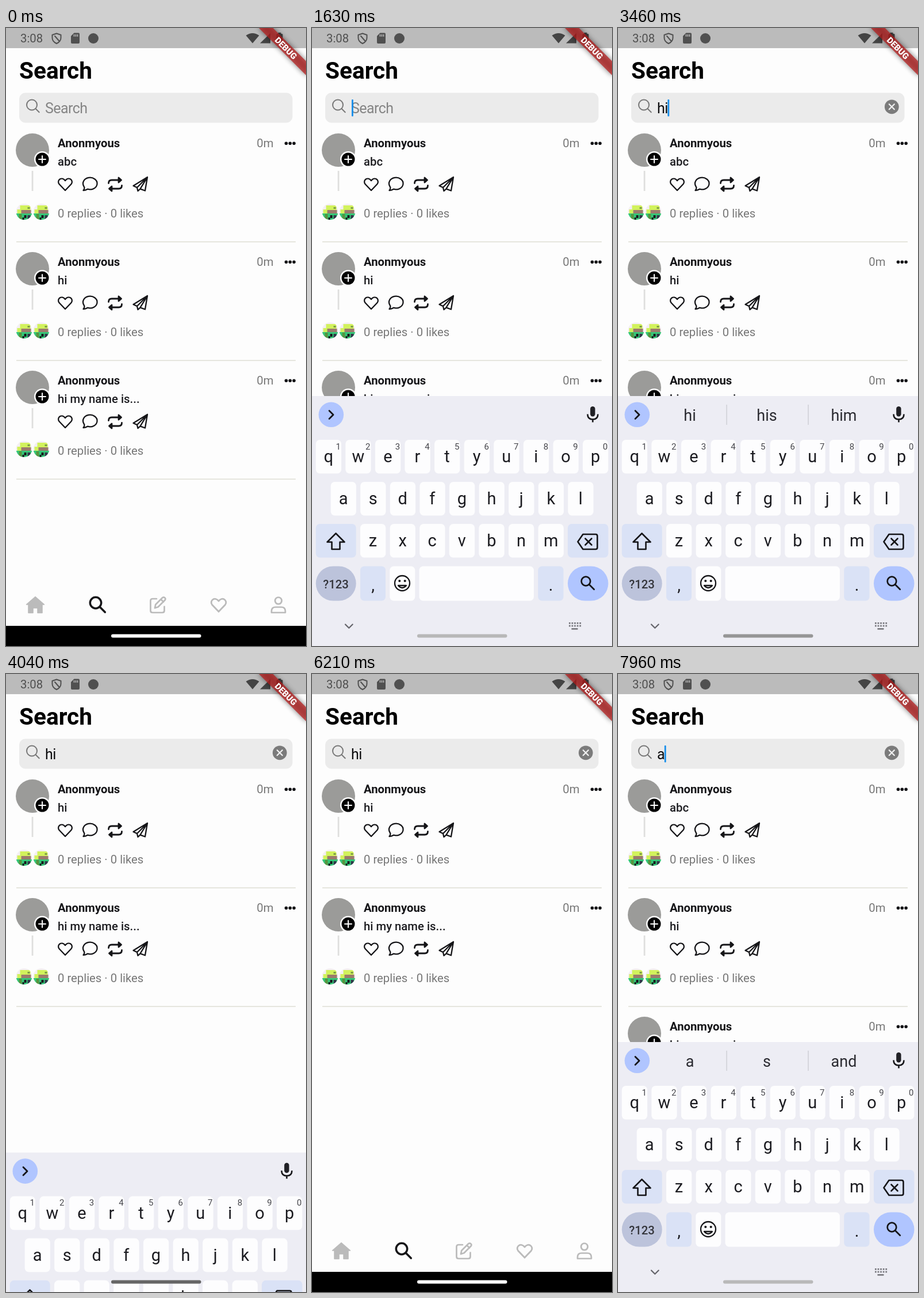
These frames come from a looping animation (522x1073 px, 8 s). An HTML page:

```html
<!DOCTYPE html>
<html lang="en">
<head>
<meta charset="utf-8">
<title>Search screen</title>
<style>
html, body { margin: 0; width: 100%; height: 100%; overflow: hidden; background: #fdfdfd; }
svg { display: block; width: 522px; height: 1073px; font-family: Roboto, sans-serif; }
.line { fill: none; stroke: #151518; stroke-width: 2.3; stroke-linecap: round; stroke-linejoin: round; }
.off { stroke: #bbb; stroke-width: 2.7; }
.post { font-size: 20.3px; fill: #777; }
.field { font-size: 25px; letter-spacing: -.55px; }
.key { font-size: 29px; fill: #1b1b20; text-anchor: middle; }
.word { font-size: 27px; fill: #2b2b31; text-anchor: middle; }
</style>
</head>
<body>
<svg id="stage" viewBox="0 0 522 1073"></svg>
<script>
const PERIOD = 8000, PITCH = 206, KEYBOARD_HEIGHT = 434;
const stage = document.getElementById('stage');
const $ = id => document.getElementById(id);

const rect = (x, y, w, h, fill, r = 0) =>
  `<rect x="${x}" y="${y}" width="${w}" height="${h}" rx="${r}" fill="${fill}"/>`;
const circle = (x, y, r, fill, more = '') => `<circle cx="${x}" cy="${y}" r="${r}" fill="${fill}" ${more}/>`;
const path = (d, cls = 'line', more = '') => `<path d="${d}" class="${cls}" ${more}/>`;
const text = (x, y, s, more = '') => `<text x="${x}" y="${y}" ${more}>${s}</text>`;
const at = (x, y, body, more = '') => `<g transform="translate(${x} ${y})" ${more}>${body}</g>`;

const HEART = 'M0 10.5 L-10.5 -.5 C-15.5 -7 -6 -14.5 0 -6.5 C6 -14.5 15.5 -7 10.5 -.5Z';
const BUBBLE = 'M-12 11 C-9.5 8 -9.5 6 -11 4 A12.3 10.3 0 1 1 -4.5 8.7 Q-8 11 -12 11Z';
const REPOST = 'M-11.5 -2 Q-11.5 -7.5 -6 -7.5 H9 M6 -11.5 L10.5 -7.5 6 -3.5Z' +
               'M11.5 2 Q11.5 7.5 6 7.5 H-9 M-6 11.5 L-10.5 7.5 -6 3.5Z';
const PLANE = 'M12.5 -12 L-12 3 -5.5 6 -4 12 0 8.3 8.5 11.5Z M12.5 -12 L-5.5 6 M12.5 -12 L0 8.3';

function miniAvatar(x) {
  const art = rect(-7, -11, 18, 9, '#d2f25c') + rect(-12, -4, 9, 8, '#d2f25c') +
    rect(-5, -3, 17, 6, '#9b7b6c') + rect(6, -8, 4, 3, '#7c9c45') +
    rect(-14, 3, 28, 12, '#35c878') + rect(-9, 4, 5, 10, '#57933f') +
    rect(0, 6, 4, 5, '#17171c') + rect(6, 6, 5, 7, '#33364a') + rect(-3, 10, 3, 4, '#17171c');
  return at(x, 319, circle(0, 0, 15.5, '#fdfdfd') + circle(0, 0, 14, '#f4eff3') +
    `<g clip-path="url(#disc)">${art}</g>`);
}

function post(message, i) {
  const body = circle(46, 212, 29, '#9b9b99') + circle(63, 228, 14, '#fdfdfd') + circle(63, 228, 11.5, '#000') +
    path('M57 228h12M63 222v12', 'line', 'style="stroke:#fff;stroke-width:2"') +
    rect(44.7, 248, 2.7, 35, '#dededd') + miniAvatar(31.5) + miniAvatar(61.5) +
    text(90, 207.3, 'Anonmyous', 'font-weight="600" fill="#151518"') +
    text(90, 239, message, 'font-weight="500" fill="#1c1c20"') +
    text(465.5, 207.3, '0m', 'text-anchor="end"') +
    text(90, 329, '0 replies · 0 likes') +
    [487.5, 494.3, 501.1].map(x => circle(x, 200.3, 2.8, '#151518')).join('') +
    at(103, 271.5, path(HEART)) + at(146.5, 271, path(BUBBLE)) +
    at(190, 271.5, path(REPOST, 'line', 'style="stroke-width:2.8"')) + at(233.5, 271, path(PLANE)) +
    rect(18, 370.5, 486, 1.6, '#e0e0d6');
  return `<g id="post${i}" class="post">${body}</g>`;
}

function statusBar() {
  const ink = '#505050';
  return rect(0, 0, 522, 35, '#bbb') + text(25, 25, '3:08', `font-size="20.3" fill="${ink}"`) +
    path('M88 9.5 L95.5 12 V17 C95.5 22 92.5 25 88 27 C83.5 25 80.5 22 80.5 17 V12Z M85 14 L92 22', 'line',
      `style="stroke:${ink};stroke-width:2"`) +
    path('M118.500 8.500 H126 Q128 8.500 128 10.500 V25 Q128 27 126 27 H115 Q113 27 113 25 V14Z', '', `fill="${ink}"`) +
    path('M118.500 11v4M121.500 11v4M124.500 11v4', '', 'stroke="#bbb" stroke-width="1.5"') +
    circle(152, 18, 9, ink) +
    path('M417.500 13 Q429 5 440.500 13 L429 26.500Z M460 9 V26.500 H442Z', '', 'fill="#444"') +
    rect(470.5, 10, 11, 17, '#444', 1.5) + rect(473.5, 8, 5, 3, '#444');
}

function banner() {
  return `<g transform="translate(522 0) rotate(45)">
    <rect x="-58" y="40.600" width="116" height="17.400" filter="url(#soft)" opacity=".5"/>
    ${rect(-70, 40.6, 140, 17.4, 'rgba(183,28,28,.72)')}
    ${text(0, 54.6, 'DEBUG', 'font-size="14.8" font-weight="900" fill="#fff" text-anchor="middle"')}</g>`;
}

function searchField() {
  return rect(23, 112.5, 475.5, 52, '#ebebeb', 11) +
    path('M54.500 0', 'line') +
    `<g class="line" style="stroke:#777;stroke-width:2"><circle cx="45" cy="133.500" r="9"/><path d="M51.700 140.200l6 6"/></g>` +
    text(68, 147.5, '', 'id="query" class="field"') +
    `<rect id="cursor" y="124" width="2.800" height="29.500" rx="1.200" fill="#168eea"/>` +
    `<g id="clear">${circle(476.3, 136.8, 12.4, '#7b7b7b')}${path('M471.800 132.300l9 9m0-9l-9 9', 'line',
      'style="stroke:#f0f0f0"')}</g>`;
}

function navigation() {
  return path('M51 987.500 L66.500 1001 H63 V1015.500 H55 V1007 H47 V1015.500 H39 V1001 H35.500Z', '',
      'fill="#bbb" stroke="#bbb" stroke-width="1.500" stroke-linejoin="round"') +
    `<g class="line" style="stroke-width:3.500"><circle cx="156" cy="998" r="9.700"/><path d="M163.300 1005.300l9 9"/></g>` +
    path('M262 991h-7q-3.500 0-3.500 3.500v17q0 3.500 3.500 3.500h17q3.500 0 3.500-3.500v-7' +
      'M259 1007l1.300-6 12-12q2-1.500 4 .3t.3 4l-12 12zM269.500 992l4.500 4.500', 'line off') +
    at(370, 1002, path(HEART, 'line off', 'transform="scale(1.08)"')) +
    path('M474 988.500a5.800 5.800 0 1 1-.1 0zM462 1015v-2.500q0-7 7-7h10q7 0 7 7v2.500z', 'line off') +
    rect(0, 1038, 522, 35, '#000');
}

function keyboard() {
  const white = '#fdfdfe', tint = '#dae2f6', blue = '#b0c5ff';
  const row = (letters, x, y, digits) => [...letters].map((c, i) => {
    const left = x + i * 51.6;
    return rect(left, y, 44.3, 58.5, white, 7) + text(left + 22, y + 38.8, c, 'class="key"') +
      (digits ? text(left + 39, y + 16.5, (i + 1) % 10, 'font-size="15" fill="#45454b" text-anchor="middle"') : '');
  }).join('');
  return rect(0, 639, 522, KEYBOARD_HEIGHT, '#ededf4') +
    circle(33.3, 671.3, 21.8, blue) + path('M30 664.500l7 7-7 7', 'line', 'style="stroke-width:2.800"') +
    `<g id="words">${rect(188.3, 654, 1.6, 35, '#d0d1d8')}${rect(330.3, 654, 1.6, 35, '#d0d1d8')}
      ${[125, 259, 393].map((x, i) => text(x, 682, '', `id="word${i}" class="word"`)).join('')}</g>` +
    rect(484.2, 657, 8.4, 17.5, '#202025', 4.2) +
    path('M479.500 670.500q0 9 9 9t9-9M488.500 680v4.500', 'line', 'style="stroke-width:2.600;stroke-linecap:butt"') +
    row('qwertyuiop', 6.7, 715, true) + row('asdfghjkl', 32.6, 788) +
    rect(6.7, 861, 70, 58.5, tint, 7) + row('zxcvbnm', 84, 861) + rect(445, 861, 70.5, 58.5, tint, 7) +
    path('M41.500 877.500l15 15h-8v12.500h-14v-12.500h-8z', 'line', 'style="stroke-width:2.600"') +
    path('M471.500 879h22q3 0 3 3v20q0 3-3 3h-22l-9-13zM475.500 886.500l11 11m0-11l-11 11', 'line',
      'style="stroke-width:2.600"') +
    rect(6.7, 934.5, 70, 60, '#bcc3db', 30) + rect(84, 934.5, 44, 60, tint, 7) + rect(135.3, 934.5, 44, 60, white, 7) +
    rect(186.5, 934.5, 199.5, 60, white, 7) + rect(393.3, 934.5, 44.3, 60, tint, 7) + rect(445, 934.5, 70.5, 60, blue, 30) +
    text(41.5, 973, '?123', 'font-size="20.3" font-weight="500" fill="#33343a" text-anchor="middle"') +
    text(106, 977, ',', 'class="key"') + text(415.5, 977, '.', 'class="key"') +
    `<g class="line"><circle cx="157" cy="964" r="13"/><path d="M150 968q7 8 14 0z"/></g>` +
    circle(152.3, 960, 2.1, '#151518') + circle(161.7, 960, 2.1, '#151518') +
    `<g class="line" style="stroke-width:2.700"><circle cx="476.500" cy="960.500" r="7.800"/><path d="M482.300 966.300l8.500 8.500"/></g>` +
    path('M58 1035.500l6.300 6.300 6.300-6.300', 'line', 'style="stroke:#66666c"') +
    [0, 1].map(r => [0, 1, 2, 3, 4].map(c => rect(447 + c * 4.6, 1032 + r * 4.7, 2.7, 2.7, '#77777d')).join('')).join('') +
    rect(451.5, 1042, 11, 2.6, '#77777d');
}

stage.innerHTML = `<defs>
  <clipPath id="disc"><circle r="14"/></clipPath>
  <filter id="soft" x="-30%" y="-150%" width="160%" height="400%"><feGaussianBlur stdDeviation="5"/></filter></defs>` +
  rect(0, 0, 522, 1073, '#fdfdfd') + statusBar() +
  text(23, 88, 'Search', 'font-size="40.6" font-weight="700"') + searchField() +
  ['abc', 'hi', 'hi my name is...'].map(post).join('') + navigation() +
  `<g id="keyboard">${keyboard()}</g>` +
  '<rect id="handle" x="183" y="1052.500" width="156.500" height="6" rx="3"/>' + banner();

// State changes: [start, value], the last one reached applies.
const QUERY = [[0, ''], [2240, 'h'], [2460, 'hi'], [6600, ''], [7880, 'a']];
const WORDS = [[0, ''], [2300, 'h hey how'], [2560, 'hi his him'], [3840, ''], [7900, 'a s and']];
const CURSOR_RESET = [[0, -1], [1240, 1240], [2240, 2240], [2460, 2460], [3840, -1], [7360, 7360], [7880, 7880]];
const HANDLE = [[0, 252], [1300, 252], [1800, 150], [3900, 150], [4040, 102], [4300, 120], [5040, 200],
  [5700, 252], [7460, 252], [7960, 185], [8000, 180]];
const TEXT_END = { '': 69, h: 81.5, hi: 86.4, a: 80.8 };

const step = (track, t) => track.filter(k => k[0] <= t).pop()[1];
const ease = (t, start, length) => {
  const p = Math.min(1, Math.max(0, (t - start) / length));
  return p * p * (3 - 2 * p);
};
function ramp(track, t) {
  const i = track.findIndex(k => k[0] > t);
  const [a, from] = track[i - 1], [b, to] = track[i];
  return from + (to - from) * (t - a) / (b - a);
}
const show = (id, on) => $(id).setAttribute('display', on ? 'inline' : 'none');
const shift = (id, y) => $(id).setAttribute('transform', `translate(0 ${y})`);

function draw() {
  const t = performance.now() % PERIOD;
  const query = step(QUERY, t), words = step(WORDS, t), reset = step(CURSOR_RESET, t);
  const filtered = t >= 3840 && t < 6600;

  $('query').textContent = query || 'Search';
  $('query').setAttribute('fill', query ? '#0c0c0e' : '#858585');
  show('clear', query);
  show('cursor', reset >= 0 && (t - reset) % 1000 < 500);
  $('cursor').setAttribute('x', TEXT_END[query]);

  show('post0', !filtered);
  for (let i = 0; i < 3; i++) shift('post' + i, (i - filtered) * PITCH);

  const raised = ease(t, 1290, 300) - ease(t, 3898, 310) + ease(t, 7420, 290);
  shift('keyboard', KEYBOARD_HEIGHT * (1 - raised));
  show('words', words);
  words.split(' ').forEach((w, i) => $('word' + i).textContent = w);

  const grey = Math.round(ramp(HANDLE, t));
  $('handle').setAttribute('fill', `rgb(${grey},${grey},${grey})`);
  requestAnimationFrame(draw);
}
draw();
</script>
</body>
</html>
```
